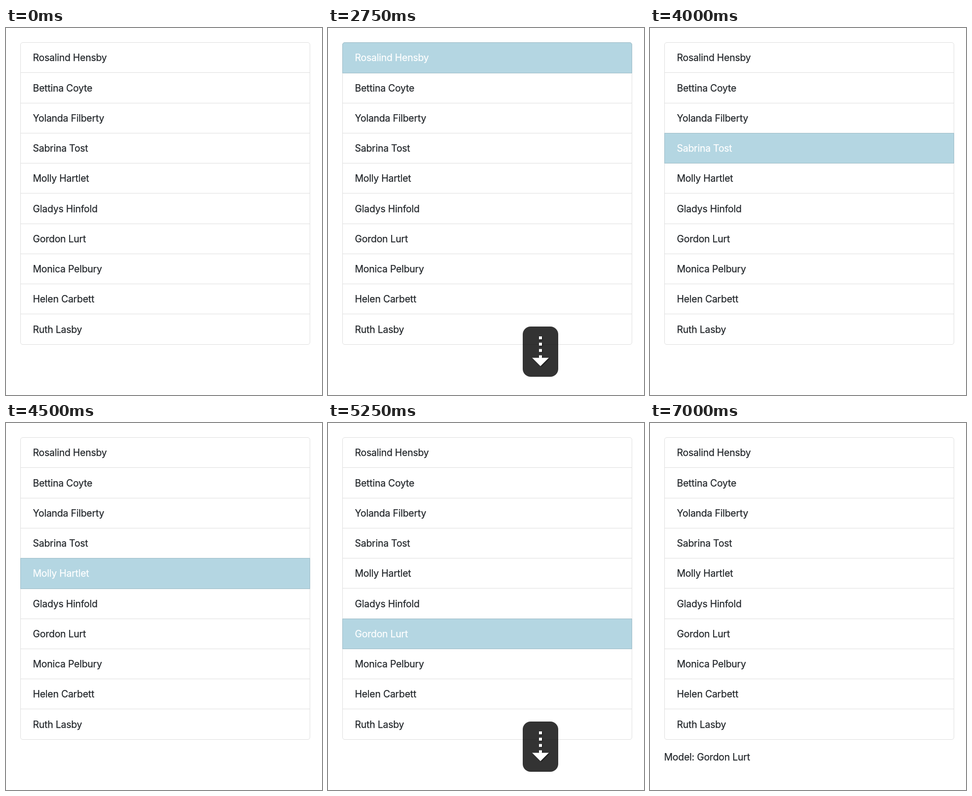
Write an HTML page with a canvas that moves like this. It is 641 px wide and 745 px high and loops after 7500 ms.

```html
<!DOCTYPE html>
<html lang="en">
<head>
<meta charset="utf-8">
<title>Keyboard list selection</title>
<style>
  html, body { margin: 0; width: 100%; height: 100%; overflow: hidden; background: #fff; }
  canvas { display: block; width: 641px; height: 745px; }
</style>
</head>
<body>
<canvas id="stage" width="641" height="745"></canvas>
<script>
const ctx = document.getElementById('stage').getContext('2d');

const LOOP = 7500;
const NAMES = [
  'Rosalind Hensby', 'Bettina Coyte', 'Yolanda Filberty', 'Sabrina Tost', 'Molly Hartlet',
  'Gladys Hinfold', 'Gordon Lurt', 'Monica Pelbury', 'Helen Carbett', 'Ruth Lasby'
];
const LIST = { left: 29, top: 29, right: 617, bottom: 643, pitch: 61.25, radius: 5 };
const KEY = { left: 395, top: 606, height: 102, padding: 22.7 };
const ADVANCE = { tab: 76.3, down: 49.3, enter: 76.3 };

// Each step overrides the defaults from its start time until the next step.
const STEPS = [
  { at: 0 },
  { at: 1500, focus: true, key: 'tab' },
  { at: 2000, focus: true },
  { at: 2750, row: 0, key: 'down' },
  { at: 3000, row: 2, key: 'down', count: 3 },
  { at: 3500, row: 3, key: 'down', count: 4 },
  { at: 3750, row: 3, key: 'down', count: 4, alpha: 0.5 },
  { at: 4000, row: 3 },
  { at: 4250, row: 4, key: 'down' },
  { at: 4500, row: 4 },
  { at: 4750, row: 5, key: 'down' },
  { at: 5000, row: 5 },
  { at: 5250, row: 6, key: 'down' },
  { at: 5500, row: 6 },
  { at: 5750, row: 6, model: 6, key: 'enter' },
  { at: 6250, row: 6, model: 6 },
  { at: 7000, model: 6 }
];

const rowTop = i => LIST.top + i * LIST.pitch;

function roundedPath(x, y, w, h, radii) {
  ctx.beginPath();
  ctx.roundRect(x, y, w, h, radii);
}

function polygon(...points) {
  ctx.beginPath();
  points.forEach(([x, y]) => ctx.lineTo(x, y));
  ctx.fill();
}

// A hairline outline gives the text slightly more weight than the regular cut.
function label(text, x, y, color = '#212529') {
  ctx.font = '400 19.4px Inter, "Liberation Sans", sans-serif';
  ctx.letterSpacing = '-0.2px';
  ctx.fillStyle = ctx.strokeStyle = color;
  ctx.lineWidth = 0.25;
  ctx.lineJoin = 'round';
  ctx.fillText(text, x, y);
  ctx.strokeText(text, x, y);
}

function drawList(active) {
  const { left, top, right, bottom, radius } = LIST;
  const width = right - left;

  ctx.fillStyle = '#dfdfdf';
  for (let i = 1; i < NAMES.length; i++) {
    ctx.fillRect(left, Math.round(rowTop(i)), width, 1);
  }
  ctx.lineWidth = 1;
  ctx.strokeStyle = '#dfdfdf';
  roundedPath(left + 0.5, top + 0.5, width - 1, bottom - top - 1, radius - 0.5);
  ctx.stroke();

  if (active !== undefined) {
    const y = Math.round(rowTop(active));
    const end = Math.round(rowTop(active) + LIST.pitch + 1.25);
    const corner = active === 0 ? radius - 0.5 : 0;
    roundedPath(left + 0.5, y + 0.5, width - 1, end - y - 1, [corner, corner, 0, 0]);
    ctx.fillStyle = '#b4d6e2';
    ctx.fill();
    ctx.strokeStyle = '#9dbbc6';
    ctx.stroke();
  }

  NAMES.forEach((name, i) => {
    label(name, 54.5, Math.round(rowTop(i) + 38.25), i === active ? '#fff' : undefined);
  });
}

function drawFocusRing() {
  const { left, top, right, bottom } = LIST;
  for (const [width, color] of [[5.6, '#c3dafb'], [3, '#85b4f8']]) {
    ctx.lineWidth = width;
    ctx.strokeStyle = color;
    roundedPath(left - 1.6, top - 1.6, right - left + 3.2, bottom - top + 3.2, 2.5);
    ctx.stroke();
  }
}

// Glyphs are drawn in stage coordinates for the first slot of the key box.
const GLYPHS = {
  tab() {
    ctx.fillRect(412, 655, 38, 6);
    polygon([449, 641], [466, 658], [449, 675]);
    ctx.fillRect(471, 641, 6, 34);
  },
  down() {
    for (let i = 0; i < 4; i++) ctx.fillRect(428, 626 + i * 12.8, 6, 6);
    polygon([414, 669.5], [448, 669.5], [431, 686.5]);
  },
  enter() {
    polygon([429, 647], [412, 664], [429, 681]);
    ctx.lineWidth = 6;
    ctx.strokeStyle = '#fff';
    ctx.beginPath();
    ctx.moveTo(428, 664);
    ctx.lineTo(464, 664);
    ctx.arc(464, 654, 10, Math.PI / 2, -Math.PI / 2, true);
    ctx.lineTo(455, 644);
    ctx.stroke();
  }
};

function drawKey({ key, count = 1, alpha = 1 }) {
  ctx.save();
  ctx.globalAlpha = alpha;
  ctx.fillStyle = 'rgba(0, 0, 0, 0.8)';
  roundedPath(KEY.left, KEY.top, KEY.padding + count * ADVANCE[key], KEY.height, 16);
  ctx.fill();

  ctx.fillStyle = '#fff';
  ctx.shadowColor = 'rgba(0, 0, 0, 0.8)';
  ctx.shadowBlur = 2;
  ctx.shadowOffsetX = ctx.shadowOffsetY = 1;
  for (let i = 0; i < count; i++) {
    GLYPHS[key]();
    ctx.translate(ADVANCE[key], 0);
  }
  ctx.restore();
}

function render(time) {
  const step = STEPS.findLast(s => s.at <= time % LOOP);
  ctx.fillStyle = '#fff';
  ctx.fillRect(0, 0, 641, 745);
  drawList(step.row);
  if (step.focus) drawFocusRing();
  if (step.model !== undefined) label('Model: ' + NAMES[step.model], 28.5, 685);
  if (step.key) drawKey(step);
}

const start = performance.now();
function tick() {
  render(performance.now() - start);
  requestAnimationFrame(tick);
}
tick();
</script>
</body>
</html>
```
